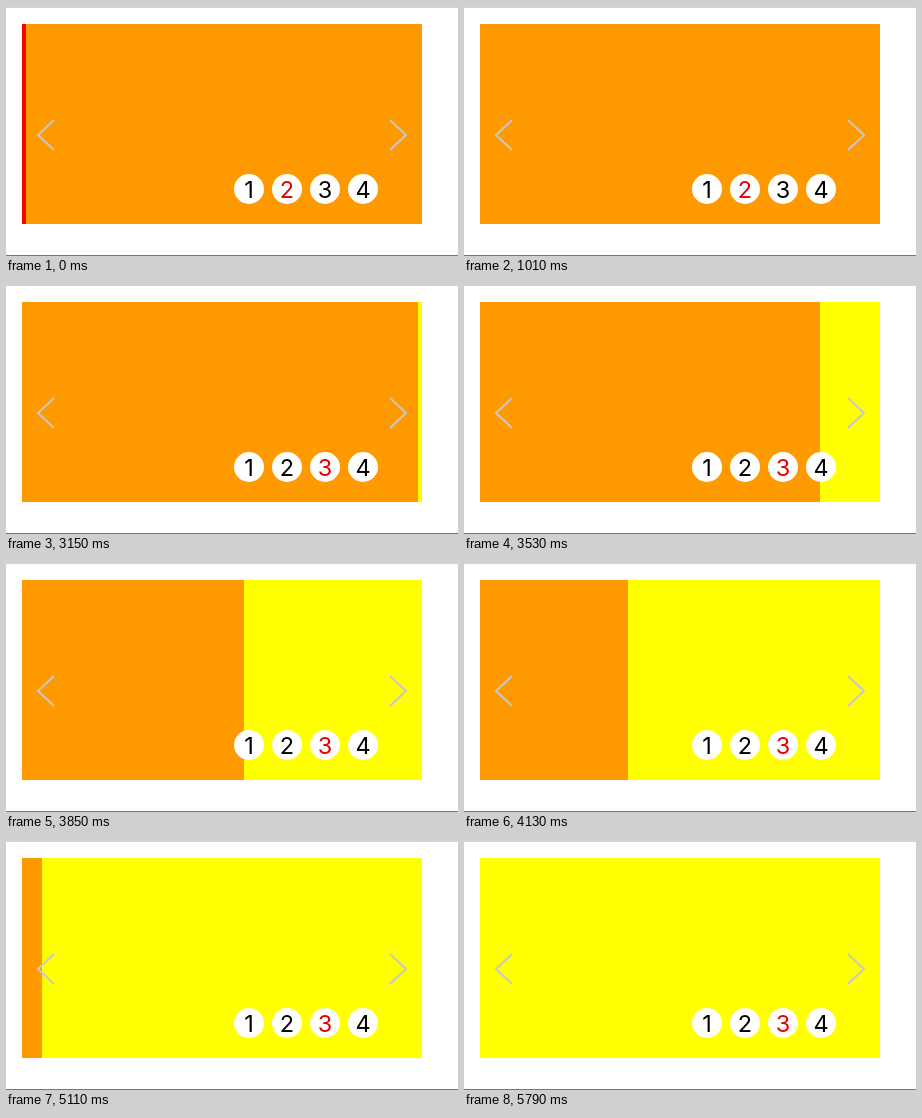
An HTML page for the animation above (8000 ms loop, 452 by 250 pixels).

```html
<!DOCTYPE html>
<html lang="en">
<head>
<meta charset="utf-8">
<title>Carousel</title>
<style>
  html, body { margin: 0; width: 100%; height: 100%; overflow: hidden; background: #fff; }
  svg { display: block; width: 452px; height: 250px; }
  .dots circle { fill: #fff; }
  .dots text { font: 23.5px Inter, Roboto, sans-serif; text-anchor: middle; fill: #000; }
  .dots .on { fill: #e60000; }
  .arrow { fill: none; stroke: #c8c8c8; stroke-width: 2; }
</style>
</head>
<body>
<svg viewBox="0 0 452 250">
  <rect width="452" height="2" fill="#d3d3d3"/>
  <rect y="249" width="452" height="1" fill="#777"/>
  <clipPath id="view"><rect x="16" y="18" width="400" height="200"/></clipPath>
  <g clip-path="url(#view)" shape-rendering="crispEdges">
    <g id="strip">
      <rect x="16" y="18" width="400" height="200" fill="#f00"/>
      <rect x="416" y="18" width="400" height="200" fill="#ff9900"/>
      <rect x="816" y="18" width="400" height="200" fill="#ff0"/>
    </g>
  </g>
  <path class="arrow" d="M48 114 32 129 48 144M384 114 400 129 384 144"/>
  <g class="dots">
    <circle cx="243" cy="183" r="15"/><text x="243" y="192">1</text>
    <circle cx="281" cy="183" r="15"/><text x="281" y="192">2</text>
    <circle cx="319" cy="183" r="15"/><text x="319" y="192">3</text>
    <circle cx="357" cy="183" r="15"/><text x="357" y="192">4</text>
  </g>
</svg>
<script>
const LOOP = 8000, SLIDE_TICKS = 60, CYCLE_TICKS = 120, START_TICK = 65, WIDTH = 400;
const strip = document.getElementById('strip');
const labels = document.querySelectorAll('.dots text');

// Ticks come in threes, held for 100, 20 and 20 ms.
function tickAt(ms) {
  const t = ms - 70, group = Math.floor(t / 140), rest = t - group * 140;
  return group * 3 + (rest < 100 ? 0 : rest < 120 ? 1 : 2);
}

// cubic-bezier(.25, .1, .25, 1)
function ease(x) {
  if (x <= 0) return 0;
  if (x >= 1) return 1;
  const curve = (s, a, b) => 3 * s * (1 - s) * ((1 - s) * a + s * b) + s ** 3;
  let lo = 0, hi = 1;
  for (let i = 0; i < 30; i++) {
    const mid = (lo + hi) / 2;
    if (curve(mid, .25, .25) < x) lo = mid; else hi = mid;
  }
  return curve(lo, .1, 1);
}

function render(ms) {
  const tick = tickAt(ms);
  const second = tick >= START_TICK;
  const start = second ? START_TICK : START_TICK - CYCLE_TICKS;
  const left = 2 * Math.round(WIDTH * (1 - ease((tick - start) / SLIDE_TICKS)) / 2);
  const active = second ? 2 : 1;
  strip.setAttribute('transform', `translate(${left - active * WIDTH})`);
  labels.forEach((label, i) => label.classList.toggle('on', i === active));
}

const origin = performance.now();
function loop() {
  render((performance.now() - origin) % LOOP);
  requestAnimationFrame(loop);
}
loop();
</script>
</body>
</html>
```
